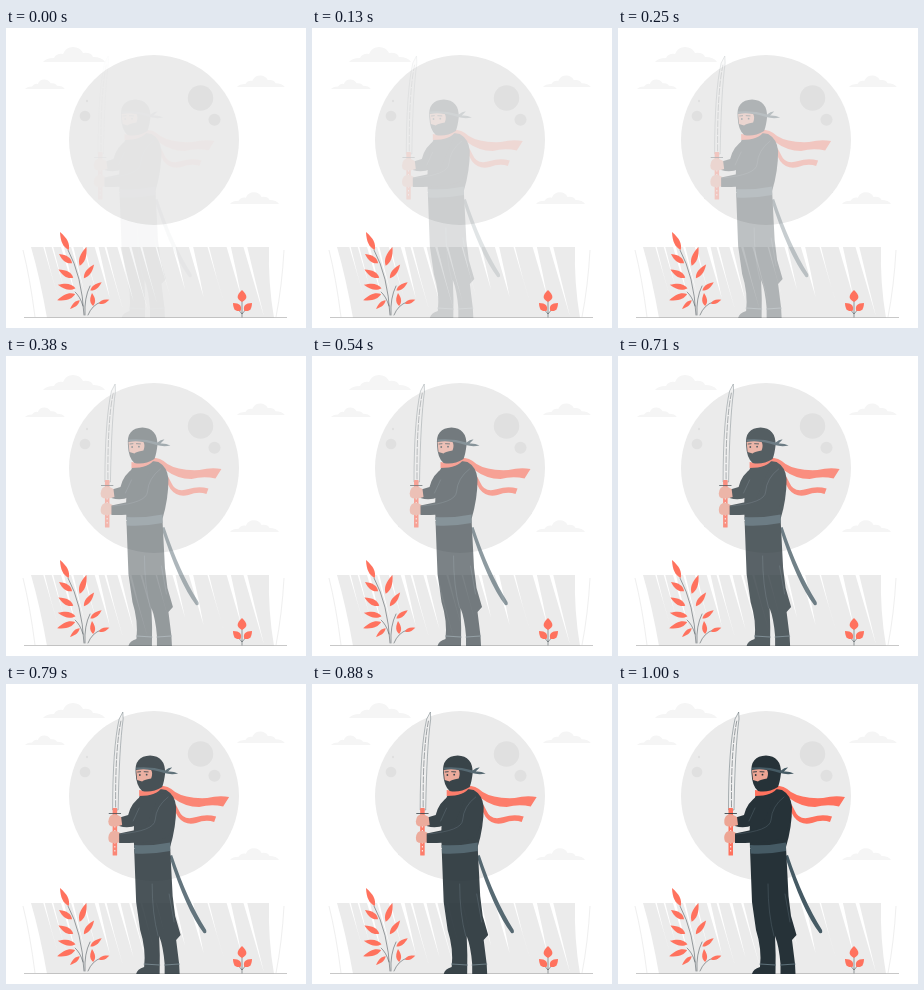
An HTML page for the animation above (1040 ms loop, 300 by 300 pixels).

```html
<!DOCTYPE html>
<html lang="en">
<head>
<meta charset="utf-8">
<title>Ninja under the moon</title>
<style>
  html, body { margin: 0; width: 100%; height: 100%; overflow: hidden; background: #fff; }
  svg { display: block; width: 100vw; height: 100vh; }
  .ink { fill: #263238; }
  .slate { fill: #455a64; }
  .red { fill: #ff725e; }
  .skin { fill: #eda594; }
  .line { fill: none; stroke: #263238; stroke-width: .45; stroke-linecap: round; }
  .seam { fill: none; stroke: #5d7079; stroke-width: .4; stroke-linecap: round; }
</style>
</head>
<body>
<svg viewBox="0 0 300 300">
  <defs>
    <path id="cloud" d="M0 0Q3 -4 11 -4Q14 -9 20 -8Q23 -15 30 -15Q37 -15 40 -9Q48 -10 50 -5Q59 -5 62 0Z"/>
  </defs>
  <g fill="#f5f5f5">
    <use href="#cloud" transform="translate(37 34)"/>
    <use href="#cloud" transform="translate(19 61) scale(.64)"/>
    <use href="#cloud" transform="translate(231 59) scale(.77)"/>
    <use href="#cloud" transform="translate(224 176) scale(.79)"/>
  </g>
  <circle cx="148" cy="112" r="85" fill="#ebebeb"/>
  <g fill="#e0e0e0">
    <circle cx="194.5" cy="70" r="12.7"/>
    <circle cx="208.5" cy="91.7" r="6"/>
    <circle cx="79" cy="88" r="5.3"/>
    <circle cx="81" cy="73" r="1.2"/>
  </g>

  <path d="M25 219H263Q262 255 268 290H41Q34 250 25 219Z" fill="#ebebeb"/>
  <g id="slits" fill="#fff"></g>
  <path d="M17 222Q24 250 29 289M278 222Q276 258 270 289" fill="none" stroke="#efefef"/>
  <path d="M18 289.5H281" stroke="#b0b0b0" stroke-width=".7"/>

  <path class="line" d="M78 287Q76 248 62 222M77 278Q74 268 69 264M79 287Q78 270 84 258M82 287Q86 277 95 274M236 289V272M231 280L236 286L241 280"/>
  <g id="leaves" class="red"></g>

  <g id="ninja">
    <!-- scabbard -->
    <path class="slate" d="M167 172L170 171Q185 216 204 246Q205 250 201.500 249Q184 226 167 172Z"/>

    <!-- scarf tails -->
    <path class="red" d="M157 107Q171 113 177 127Q181 137 194 133Q204 130 214 132.500L212 138Q204 135 194 139Q183 142 176 133Q170 119 156 112Z"/>
    <path class="red" d="M153 102Q164 100 173 108Q184 115 205 114Q217 111 227 113L221 122.500Q209 120 197 123Q183 123 171 114Q164 108 153 109Z"/>

    <!-- legs and boots -->
    <path class="ink" d="M132 165L168 163L170.500 212L173 232L178.500 251L174 256L177 280L177.500 290H162.500V280Q161 262 157 252Q158 270 157.500 290H134Q135 285 142 283Q144 265 138 246L134 218Z"/>
    <path class="seam" d="M150 200Q150 230 156 252M167 210L172 238"/>
    <path class="seam" d="M142 280L157.500 281M162.500 281L177 280" style="stroke-width:1.200"/>

    <!-- far arm and torso -->
    <path class="ink" d="M141 111Q129 118 126 131L116 134L117 142Q126 145 135 141Z"/>
    <path class="ink" d="M139 109Q150 103 164 106Q173 111 174 123Q174 143 168 163L132 164Q130 125 139 109Z"/>
    <path class="slate" d="M132 161Q151 162 168 158.500V167Q150 170.500 132.500 169.500Z"/>

    <!-- sword -->
    <path d="M110.500 126Q110.500 64 117 35L120.700 28L121 35Q117 64 116 126Z" fill="#efefef" stroke="#37474f" stroke-width=".4"/>
    <path class="line" d="M113.500 123Q113 64 119 36" stroke-dasharray="6 2"/>
    <rect class="red" x="110.500" y="124" width="4.500" height="47.500" rx=".6"/>
    <path d="M112.700 142v28" stroke="#fff" stroke-width=".9" stroke-dasharray="1.500 2.500"/>
    <path class="line" d="M107 129.500H118.500" style="stroke-width:.8"/>

    <!-- hands -->
    <path id="hand" class="skin" d="M119 133Q112 128 108 132Q105 136 107 141Q110 144 120 141Z"/>
    <use href="#hand" y="16.500"/>

    <!-- near arm -->
    <path class="ink" d="M158 109Q173 110 173 124Q172 143 166 152Q160 159 117 159L117 149.500L143 144Z"/>
    <path class="seam" d="M166 113Q154 122 153 136Q152 147 118 150M137 124L131 137"/>

    <!-- collar and head -->
    <path class="red" d="M137 106Q145 108 153 101L160 103Q155 112 137 112Z"/>
    <path class="ink" d="M133.500 89Q132 72 148 71.500Q163 72 163 89Q162 98 160 103Q150 109 140 107Q134 102 133.500 89Z"/>
    <path class="skin" d="M134 86Q142 84 149 86Q151 89 149 94.500Q141 96 140 97.500L135 96Z"/>
    <path class="slate" d="M134 83.500Q149 82 163 86.500Q167 83 170 83.500L166 87.500Q171 87 176 89.500Q169 91 162 89Q149 84 134 85.500Z"/>
    <path class="line" d="M135.500 88l3-.3M142 87.700l4 .2" style="stroke-width:.9"/>
    <circle class="ink" cx="137.700" cy="91" r=".9"/>
    <circle class="ink" cx="144.500" cy="90.700" r=".9"/>
  </g>
</svg>
<script>
const fill = (id, paths) => {
  document.getElementById(id).innerHTML = paths.map(d => `<path d="${d}"/>`).join("");
};

let seed = 11;
const random = () => (seed = seed * 16807 % 2147483647) / 2147483647;

// Leaning gaps in the tall grass, sparser towards the right
const slits = [];
for (let x = 37; x < 255; x += 5 + x / 20 + random() * 5) {
  const w = 1.5 + random() * 3, depth = 40 + random() * 31;
  const lean = depth * 0.3;
  slits.push(`M${x} 218H${x + w}Q${x + w + lean * 0.4} ${219 + depth / 2} ${x + lean} ${219 + depth}Z`);
}
fill("slits", slits);

// A leaf runs from its tip back to its base at the given angle
function leaf(x, y, length, degrees, width = 6) {
  const a = degrees * Math.PI / 180, c = Math.cos(a), s = Math.sin(a);
  const at = (u, v) => `${x + u * c - v * s} ${y + u * s + v * c}`;
  const side = v => `${at(length * 0.45, v)} ${at(length * 0.75, v)}`;
  return `M${x} ${y}C${side(width * 0.65)} ${at(length, 0)}C${at(length * 0.75, -width * 0.65)} ${at(length * 0.45, -width * 0.65)} ${x} ${y}Z`;
}
const leaves = [
  leaf(54, 204, 20, 64), leaf(64, 281, 13, -42, 4), leaf(86, 265, 13, 85, 5),
  leaf(236, 262, 12, 90, 9), leaf(227, 275, 11, 45, 7), leaf(246, 275, 11, 135, 7)
];
for (let i = 0; i < 4; i++) {
  leaves.push(leaf(53 - i * 0.6, 226 + i * 15.4, 16 + i, 35 - 6 * i * i));
  leaves.push(leaf(80.5 + i * 7.6, 219 + i * 17.6, 20 - i * 3, 110 + i * 17, 6 - i * 0.7));
}
fill("leaves", leaves);

const LOOP = 1040, STEPS = 24, SLIDE = 18.5;
const ninja = document.getElementById("ninja");
const start = performance.now();

function draw(now) {
  const t = Math.max(0, now - start) % LOOP;
  // 24 poses per second; the first pose is held twice as long
  const step = Math.min(STEPS, Math.floor(t * 0.024 + 0.15));
  const p = step < 2 ? 0 : step / STEPS;
  ninja.setAttribute("transform", `translate(${-SLIDE * (1 - p)} 0)`);
  ninja.setAttribute("opacity", Math.max(0.03, p + 0.25 * p * (1 - p)));
  requestAnimationFrame(draw);
}
draw(start);
</script>
</body>
</html>
```
